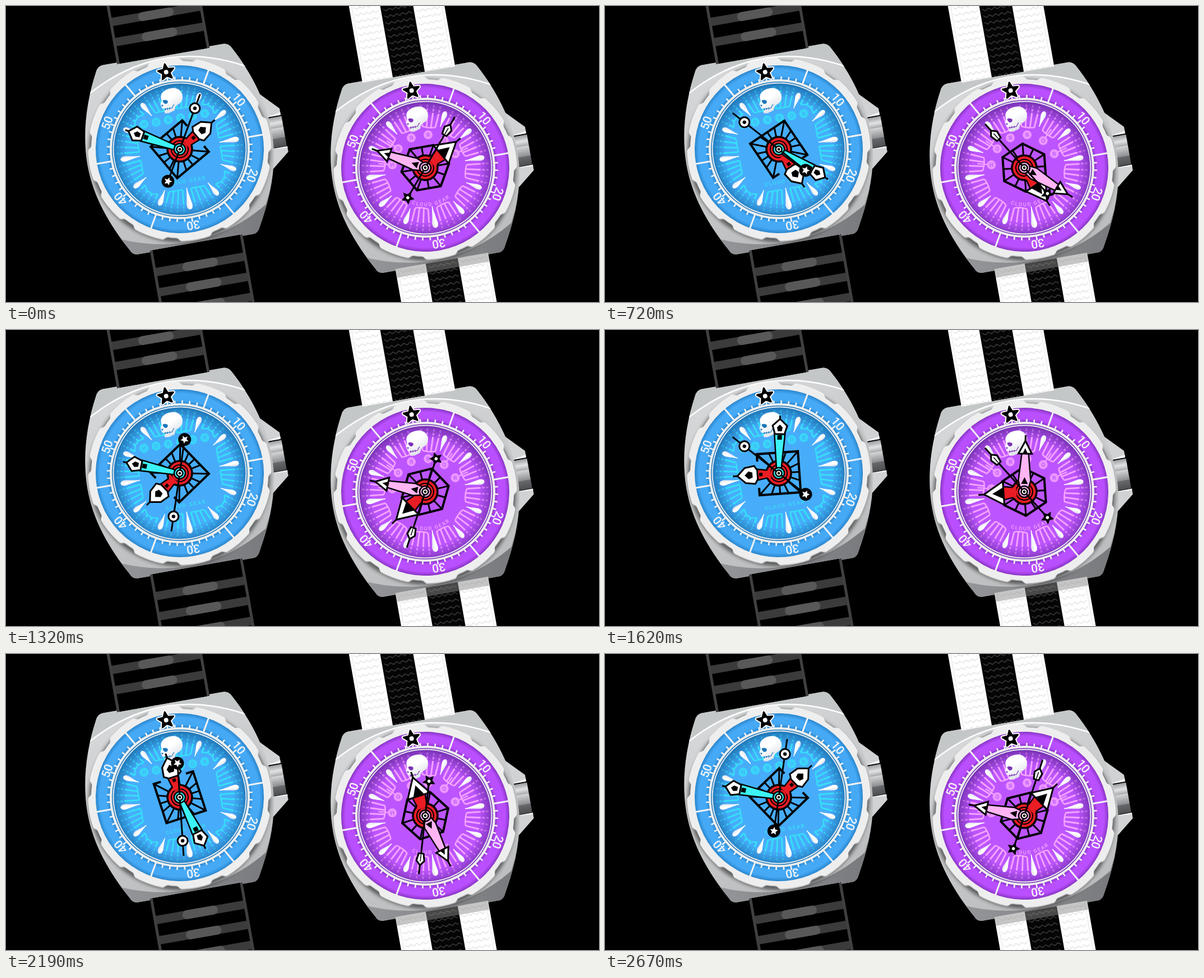
Write an HTML page that moves like this. It is 1058 px wide and 529 px high and loops after 2.7 s.

```html
<!DOCTYPE html>
<html lang="en">
<head>
<meta charset="utf-8">
<title>Two dive watches</title>
<style>
html, body { margin: 0; width: 100%; height: 100%; overflow: hidden; background: #000; }
svg { display: block; width: 100%; height: 100%; }
text { font-family: Roboto, "Liberation Sans", sans-serif; text-anchor: middle; }
</style>
</head>
<body>
<svg id="stage" viewBox="0 0 1058 529"></svg>
<script>
const FRAME = 30, FRAMES = 90;
const rad = d => d * Math.PI / 180;
// Clockwise polar coordinates, 0 degrees pointing up
const polar = (r, a) => [r * Math.sin(rad(a)), -r * Math.cos(rad(a))];
const pt = p => p.map(v => v.toFixed(2)).join();
const range = (n, fn) => Array.from({ length: n }, (_, i) => fn(i));
const poly = (pts, attrs) => `<polygon points="${pts.map(pt).join(' ')}" ${attrs}/>`;
const trail = (pts, attrs) => `<polyline points="${pts.map(pt).join(' ')}" fill="none" ${attrs}/>`;
const disc = (r, attrs, x = 0, y = 0) => `<circle cx="${x}" cy="${y}" r="${r}" ${attrs}/>`;
const rect = (x, y, w, h, attrs) => `<rect x="${x}" y="${y}" width="${w}" height="${h}" ${attrs}/>`;
const ray = (a, r1, r2, attrs) => trail([polar(r1, a), polar(r2, a)], attrs);
const star = (R, r) => range(10, i => polar(i % 2 ? r : R, i * 36));
const shift = (pts, dy) => pts.map(([x, y]) => [x, y + dy]);
// Mirrors [half width, distance] pairs into a symmetric hand shape pointing up
const mirror = half => [...half.map(([w, d]) => [w, -d]), ...half.slice().reverse().map(([w, d]) => [-w, -d])];
const ink = w => `stroke="#000" stroke-width="${w}"`;

const themes = [
  { id: 'blue', x: 310, y: 256, dial: '#47adfa', edge: '#1f78b8', ring: '#45a9f6', ringEdge: '#2b86cc',
    line: '#36e0f8', hand: '#3cf2f5', square: true, second: 20.2 },
  { id: 'violet', x: 748, y: 289, dial: '#bd55ff', edge: '#7a33b5', ring: '#b94fff', ringEdge: '#8a35c4',
    line: '#f6a8ff', hand: '#ffb5f4', square: false, second: 30.2 }
];

const caseShape = 'M-84,-172H-110Q-119,-171-123,-162C-150,-112-167,-55-167,0C-167,55-148,110-119,162' +
  'Q-116,171-106,172H-84V169H84V172H104Q112,171 116,162C146,110 167,55 167,0C167,-55 150,-112 123,-162Q119,-171 110,-172H84V-169H-84Z';

function defs(t) {
  return `<radialGradient id="${t.id}Dial" gradientUnits="userSpaceOnUse" cx="0" cy="4" r="121">
    <stop offset=".78" stop-color="${t.dial}"/><stop offset="1" stop-color="${t.edge}"/></radialGradient>
  <radialGradient id="${t.id}Ring" gradientUnits="userSpaceOnUse" cx="0" cy="0" r="150">
    <stop offset=".83" stop-color="${t.ringEdge}"/><stop offset=".87" stop-color="${t.ring}"/>
    <stop offset=".95" stop-color="${t.ring}"/><stop offset="1" stop-color="${t.ringEdge}"/></radialGradient>`;
}

function ladderStrap() {
  let s = '';
  for (const y of [-281.5, -245, -208.5, 209, 245.5, 282])
    s += rect(-80, y - 7.5, 160, 15, 'fill="#3b3b3b"') + rect(-32, y - 8, 64, 16, 'rx="8" fill="#585858"');
  for (const x of [-84, 79]) for (const y of [-310, 165]) s += rect(x, y, 5, 145, 'fill="#404040"');
  return s;
}

function wave(x1, x2, y, color) {
  const n = Math.round((x2 - x1) / 5.5);
  return trail(range(n + 1, i => [x1 + (x2 - x1) * i / n, y + (i % 2 ? 2 : -2)]), `stroke="${color}" stroke-width="1.7"`);
}

function wovenStrap() {
  let s = '';
  for (const y of [-330, 160]) {
    s += rect(-84, y, 168, 180, 'fill="#fff"') + rect(-29, y, 58, 180, 'fill="#050505"');
    for (const x of [-79, 79]) s += rect(x - .5, y, 1, 180, 'fill="#e4e4e4"');
    for (let k = 4; k < 180; k += 12)
      s += wave(-76, -33, y + k, '#e8e8e8') + wave(-25, 25, y + k, '#343434') + wave(33, 76, y + k, '#e8e8e8');
  }
  return s + rect(-84, 160, 168, 25, 'fill="#8b8b8b" opacity=".5"');
}

function body() {
  return rect(158, -27, 31, 54, 'fill="url(#crown)"') +
    `<path d="M148,-82L188,-41V-29H155ZM155,28H190V38L150,70Z" fill="#d0d2d3"/>
     <path d="M158,-29H188V-34ZM155,28H190V31Z" fill="#f2f2f2"/>
     <path d="${caseShape}" fill="url(#metal)"/>
     <g clip-path="url(#caseClip)">
       <path d="M-170,-108Q0,-222 170,-108V-200H-170Z" fill="#c4c7c8"/>
       <path d="M-150,-121Q0,-208 150,-121" fill="none" stroke="#fff" stroke-width="2.5"/>
       <path d="M-145,134Q0,203 134,124L160,72H200V200H-150Z" fill="url(#bevel)"/>
     </g>`;
}

function bezel(t) {
  const edge = range(360, a => {
    const off = Math.abs((a + 15) % 30 - 15);
    return polar(158 + 5.5 * Math.max(0, Math.min(1, (11.5 - off) / 2)), a);
  });
  let s = disc(162, 'fill="#000" opacity=".5" filter="url(#soft)"', -1, 4) +
    poly(shift(edge, 1.5), 'fill="#b9babb"') + poly(edge, 'fill="#eee"') + disc(150, `fill="url(#${t.id}Ring)"`);
  for (let m = 0; m < 60; m++) {
    const long = m % 10 === 5;
    s += ray(m * 6, 122, long ? 151 : m % 5 ? 130 : 132, `stroke="#f2f2f2" stroke-width="${long ? 3 : 2.6}"`);
  }
  for (let n = 10; n < 60; n += 10)
    s += `<text transform="rotate(${n * 6})" y="-130.5" font-size="21" font-weight="500" fill="#f5f5f5">${n}</text>`;
  const mark = shift(star(14.5, 6.5), -140);
  return s + poly(mark, 'fill="#fff" stroke="#fff" stroke-width="7" stroke-linejoin="round"') +
    poly(mark, `fill="#000" ${ink(3)} stroke-linejoin="round"`) + disc(4, 'fill="#fff"', 0, -140);
}

function combs(t) {
  let s = '';
  const style = (w, opacity) => `stroke="${t.line}" stroke-width="${w}" opacity="${opacity}"`;
  for (let h = 0; h < 12; h++) {
    const inner = [1, 2, 3, 4].map(k => {
      const a = h * 30 + k * 6, c = Math.max(Math.abs(Math.sin(rad(a))), Math.abs(Math.cos(rad(a))));
      const r = t.square ? Math.min(94, 72 / c) : k % 3 === 1 ? 74 : 72;
      s += ray(a, r, 99, style(3, .95)) + ray(a, 101.5, 106, style(3, .6)) + ray(a, 108.5, 113, style(3, .35));
      return polar(r, a);
    });
    s += trail(inner, style(2.5, .95));
  }
  return s;
}

function letters(t) {
  return [...'HOЯRОR'].map((c, i) => {
    const a = -75 + 30 * i;
    const [x, y] = t.square ? [-55 + 22 * i, -55] : polar(59, a);
    const stub = t.square || Math.abs(a) < 20 ? '' : ray(a, 66, 84, `stroke="${t.line}" stroke-width="2"`);
    return stub + disc(8, `fill="${t.line}" opacity=".8"`, x, y) +
      `<text x="${x}" y="${y + 3.6}" font-size="10" font-weight="500" fill="${t.dial}">${c}</text>`;
  }).join('');
}

function skull(t) {
  return `<path d="M-17,-97C-16,-107-4,-111 6,-110C16,-109 23,-101 21,-91C20,-84 15,-80 9,-79L6,-77L3,-70L-8,-67L-15,-68
    L-15,-73L-12,-75L-18,-77L-20,-85L-17,-90Z" fill="url(#bone)"/>
    <path d="M-15,-91Q-10,-93-6,-89Q-6,-84-11,-84Q-15,-86-15,-91M-19,-84L-15,-83L-17,-80Z" fill="${t.edge}"/>
    <path d="M-13,-77V-73M-9,-77V-73M-5,-77V-73M-14,-75H-1L4,-81" fill="none" stroke="${t.edge}" stroke-width="1.2"/>`;
}

function dial(t) {
  let s = disc(125, 'fill="#f0f0f0"') + disc(121, `fill="${t.edge}"`) + disc(119.5, 'fill="#e6ebf2"') +
    disc(117.5, `fill="url(#${t.id}Dial)"`) + combs(t);
  for (let h = 1; h < 12; h++) {
    const [near, far, w] = h === 6 ? [70, 109, 5.2] : h % 3 ? [78, 107, 4.5] : [72, 107, 4.8];
    const half = `M0,${-near}L${w},${8 - far}Q${w},${-far} 0,${-far}Z`;
    s += `<g transform="rotate(${h * 30})">
      <path d="${half}" transform="scale(-1 1)" fill="#fff"/><path d="${half}" fill="#eceef3"/>
      <path d="M0,${-near}V${-far}" stroke="#fff" stroke-width="1.5"/></g>`;
  }
  const label = 'CLOUD GEAR', style = `font-size="9" font-weight="500" letter-spacing="2" fill="${t.line}"`;
  s += letters(t) + (t.square
    ? `<text x="1" y="61" ${style}>${label}</text>`
    : `<path id="curve" d="M-69,0A69,69 0 0 0 69,0" fill="none"/><text ${style}><textPath href="#curve" startOffset="50%">${label}</textPath></text>`);
  return s + skull(t);
}

function web(t) {
  const n = t.square ? 4 : 6, step = 360 / n, R = t.square ? 52 : 43;
  const outer = range(n, i => polar(R, step / 2 + i * step));
  const reach = a => R * Math.cos(rad(step / 2)) / Math.cos(rad((a + step / 2) % step - step / 2));
  const [x, y] = outer[0], gap = x * .64;
  let s = trail([[gap, y], ...outer, [-gap, y]], ink(4));
  const spoke = t.square ? 22.5 : 30;
  for (let a = spoke; a < 360; a += spoke)
    if (a > 25 && a < 335) s += ray(a, 20, reach(a), ink(3));
  return s;
}

function hourHand(t) {
  const body = t.square ? [[7, 14], [10, 40]] : [[9, 14], [12, 38]];
  const [[w1, d1], [w2, d2]] = body;
  const sides = [1, -1].map(k => trail([[k * w1, -d1 - 6], [k * w2, -d2]], ink(2.5))).join('');
  return web(t) + disc(22, `fill="#ea1c24" ${ink(3.5)}`) + disc(15, `fill="none" ${ink(2)}`) +
    poly(mirror(body), 'fill="#ea1c24"') + sides +
    trail([[0, -68], [0, -82]], ink(3)) + (t.square
    ? rect(-3, -35, 6, 6, '') +
      poly(mirror([[8, 38], [16, 43], [13.5, 60], [0, 74]]), `fill="#fff" ${ink(3)}`) +
      poly(mirror([[4.5, 47], [7, 54], [0, 61]]), '')
    : poly([[-21, -37], [21, -37], [0, -72]], `fill="#fff" ${ink(3)}`) +
      poly([[-11, -36], [11, -36], [0, -57]], ''));
}

function minuteHand(t) {
  const arm = t.square
    ? trail([[0, -92], [0, -103]], ink(3)) +
      poly(mirror([[4, 5], [9.5, 70]]), `fill="${t.hand}" ${ink(2.5)}`) +
      rect(-4, -68, 8, 8, '') +
      poly(mirror([[8.5, 70], [13, 85], [0, 97]]), `fill="#fff" ${ink(3)}`) +
      poly(mirror([[3.5, 75], [5, 82], [0, 87]]), '')
    : trail([[0, -88], [0, -101]], ink(3)) +
      poly(mirror([[7, 4], [11, 20], [6, 69]]), `fill="${t.hand}" ${ink(2.5)}`) +
      poly([[-6, -14], [6, -14], [0, -26]], '') +
      poly([[-12, -68], [12, -68], [0, -91]], `fill="#fff" ${ink(3)}`) +
      poly([[-5, -67], [5, -67], [0, -78]], '');
  return arm + disc(10, `fill="${t.hand}" ${ink(2.5)}`);
}

function secondHand(t) {
  return trail([[0, 60], [0, -105]], ink(3)) + (t.square
    ? disc(9, `fill="#fff" ${ink(3)}`, 0, -78) + disc(3.2, '', 0, -78) +
      disc(11.5, '', 0, 61) + poly(shift(star(7.5, 3.5), 61), 'fill="#fff"')
    : poly(mirror([[4.5, 68], [7, 81], [0, 89]]), `fill="#fff" ${ink(3)}`) +
      trail([[0, -70], [0, -82]], ink(1.5)) +
      poly(shift(star(10, 5), 62), `fill="#000" ${ink(2)}`) + disc(2.8, 'fill="#fff"', 0, 62)) +
    disc(5.5, `fill="#fff" ${ink(2.5)}`) + disc(2.3, '');
}

function watch(t) {
  return `<g transform="translate(${t.x} ${t.y})">
    <g transform="rotate(-10)">${t.square ? ladderStrap() : wovenStrap()}${body()}${bezel(t)}${dial(t)}</g>
    <g id="${t.id}Hour">${hourHand(t)}</g><g id="${t.id}Minute">${minuteHand(t)}</g><g id="${t.id}Second">${secondHand(t)}</g></g>`;
}

document.getElementById('stage').innerHTML = `<defs>
  <linearGradient id="metal" x1="0" y1="0" x2=".25" y2="1"><stop offset="0" stop-color="#d9dbdc"/>
    <stop offset=".5" stop-color="#c9cbcc"/><stop offset="1" stop-color="#bcbebf"/></linearGradient>
  <linearGradient id="bevel"><stop offset="0" stop-color="#95979a"/><stop offset="1" stop-color="#727376"/></linearGradient>
  <linearGradient id="crown" x1="0" y1="0" x2="0" y2="1"><stop offset="0" stop-color="#9a9c9e"/>
    <stop offset=".2" stop-color="#e2e3e4"/><stop offset=".36" stop-color="#a8aaac"/><stop offset=".37" stop-color="#d4d5d6"/>
    <stop offset=".7" stop-color="#8c8e91"/><stop offset=".71" stop-color="#67696c"/><stop offset="1" stop-color="#4c4e50"/></linearGradient>
  <linearGradient id="bone" x1="0" y1="0" x2=".4" y2="1"><stop offset=".5" stop-color="#fff"/><stop offset="1" stop-color="#dde1e8"/></linearGradient>
  <clipPath id="caseClip"><path d="${caseShape}"/></clipPath>
  <filter id="soft"><feGaussianBlur stdDeviation="3"/></filter>${themes.map(defs).join('')}</defs>
  <rect width="1058" height="529"/>${themes.map(watch).join('')}`;

const hands = themes.flatMap(t => [['Hour', 50, 4], ['Minute', 289.4, 8], ['Second', t.second, 12]]
  .map(([name, start, step]) => ({ node: document.getElementById(t.id + name), start, step })));

function draw(ms) {
  const n = Math.floor(ms / FRAME) % FRAMES;
  for (const h of hands) h.node.setAttribute('transform', `rotate(${(h.start + h.step * n) % 360})`);
}

const begin = performance.now();
function tick() {
  draw(performance.now() - begin);
  requestAnimationFrame(tick);
}
tick();
</script>
</body>
</html>
```
